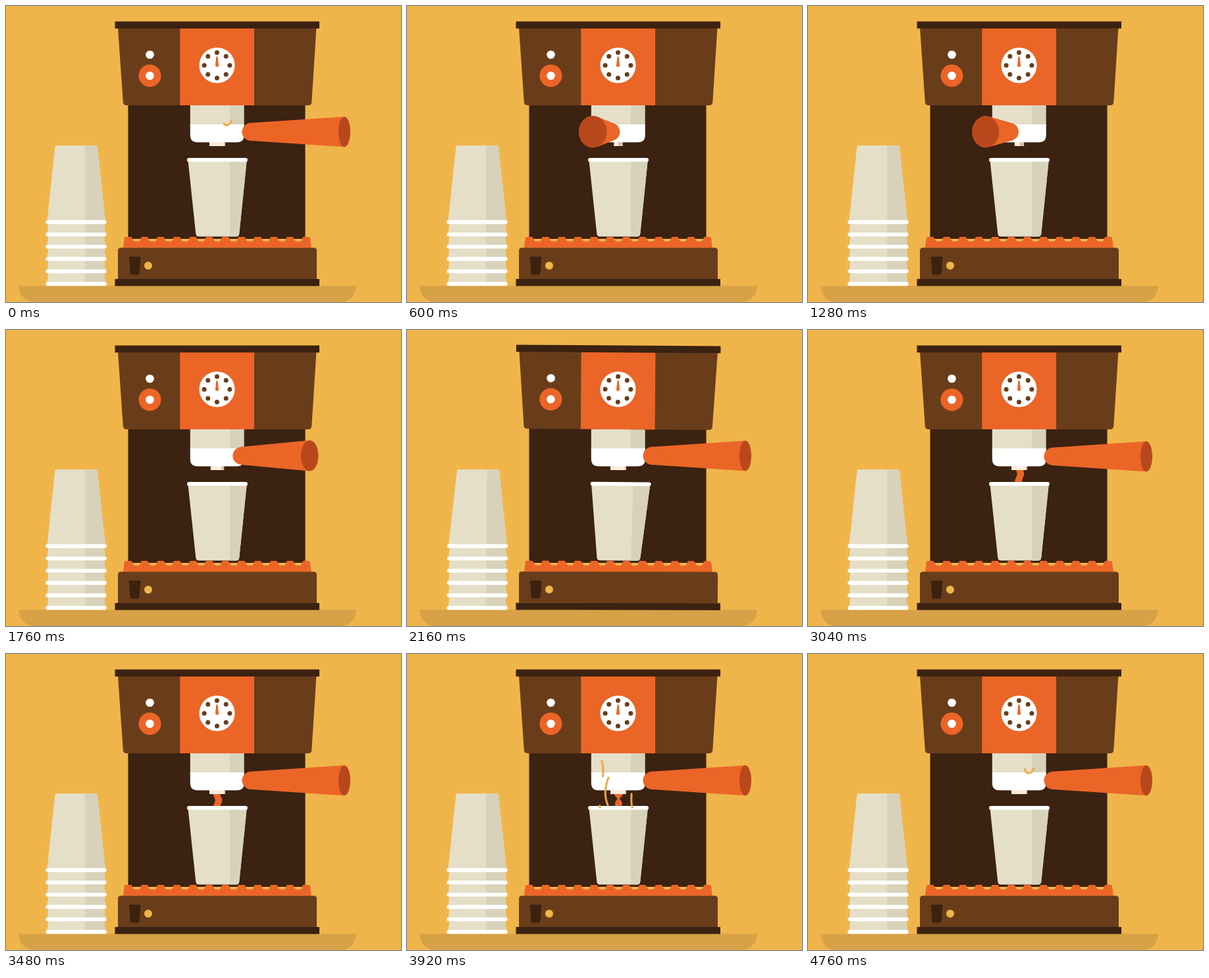
An HTML page that plays this animation: 600 by 450 pixels, repeating every 4800 ms.

```html
<!DOCTYPE html>
<html lang="en">
<head>
<meta charset="utf-8">
<title>Coffee machine</title>
<style>
  html, body { margin: 0; width: 100%; height: 100%; overflow: hidden; background: #f0b54a; }
  svg { display: block; width: 100%; height: 100%; }
  .brown { fill: #6a3d1a; }
  .dark { fill: #3b2211; }
  .orange { fill: #eb6527; }
  .rust { fill: #b8481b; }
  .cream { fill: #e5dfc8; }
  .shade { fill: #d8d2ba; }
  .white { fill: #fff; }
  .steam path { fill: none; stroke: #ecaa42; stroke-width: 3; stroke-linecap: round; }
</style>
</head>
<body>
<svg viewBox="0 0 600 450" xmlns="http://www.w3.org/2000/svg">
  <defs>
    <clipPath id="cupDark"><rect x="340" y="230" width="40" height="125"/></clipPath>
    <clipPath id="stackDark"><rect x="120" y="205" width="40" height="225"/></clipPath>
  </defs>
  <rect width="600" height="450" fill="#f0b54a"/>
  <path fill="#d6a147" d="M19 425.5H532Q530 450 503 451H48Q21 450 19 425.5Z"/>

  <g id="stack"></g>

  <rect class="dark" x="185.5" y="148" width="269" height="206"/>

  <g id="base">
    <path id="tray" class="orange"/>
    <path class="brown" d="M170 415V372Q170 367.5 174.5 367.5H467.500Q472 367.5 472 372V415Z"/>
    <rect class="dark" x="165.5" y="415" width="310.500" height="10.700"/>
    <path class="dark" d="M188 381H203.500Q204.700 381 204.600 382L202.500 406.500Q202.300 408.500 200.500 408.500H191Q189 408.500 188.800 406.500L186.800 382Q186.800 381 188 381Z"/>
    <circle cx="216" cy="394.800" r="6" fill="#f0b54a"/>
  </g>

  <g>
    <rect class="cream" x="279.800" y="148" width="60.200" height="34"/>
    <rect class="shade" x="340" y="148" width="21.700" height="34"/>
    <path class="white" d="M279.800 180H361.700V196Q361.700 207.300 350.500 207.300H291Q279.800 207.300 279.800 196Z"/>
    <rect id="spoutLight" y="207" height="6" fill="#f9ecda"/>
    <rect id="spoutDark" y="207" height="6" fill="#d3c7b0"/>
  </g>

  <g id="head">
    <path class="brown" d="M170 33H471.500L464.300 146Q464 151 459 151H183Q178.200 151 177.800 146Z"/>
    <rect class="orange" x="264.300" y="33" width="112.700" height="118"/>
    <rect class="dark" x="165.500" y="23.500" width="310.500" height="10.700"/>
    <circle class="white" cx="218.500" cy="74" r="6.300"/>
    <circle class="orange" cx="218.500" cy="106" r="17"/>
    <circle class="white" cx="218.500" cy="106" r="6.300"/>
    <circle class="white" cx="320.500" cy="90.200" r="27"/>
    <g id="dots"></g>
    <path class="orange" d="M320.500 76.500Q321.500 76.500 321.700 78L323 90Q323 92.700 320.500 92.700T318 90L319.300 78Q319.500 76.500 320.500 76.500Z"/>
  </g>

  <path id="pour" class="orange"/>

  <g id="cup">
    <path id="cupBody" class="cream" d="M276.500 235H365.700L354.300 346Q353.800 350.500 349.500 350.500H293Q288.800 350.500 288.300 346Z"/>
    <use href="#cupBody" style="display:none"/>
    <path class="shade" clip-path="url(#cupDark)" d="M276.500 235H365.700L354.300 346Q353.800 350.500 349.500 350.500H293Q288.800 350.500 288.300 346Z"/>
    <rect class="white" x="275" y="231" width="92" height="5.800" rx="2.900"/>
  </g>

  <g id="handle">
    <path id="grip" class="orange"/>
    <circle id="hub" class="orange" cy="191.200" r="13.500"/>
    <ellipse id="cap" class="rust" cy="191.200"/>
  </g>

  <g id="steam" class="steam"></g>
</svg>
<script>
const LOOP = 4800;
const $ = id => document.getElementById(id);
const set = (el, attrs) => { for (const k in attrs) el.setAttribute(k, attrs[k]); return el; };
const add = (parent, tag, attrs) =>
  parent.appendChild(set(document.createElementNS('http://www.w3.org/2000/svg', tag), attrs));

function buildStack() {
  const g = $('stack');
  const rims = [328.5, 347.3, 365.9, 384.5, 403.3, 422.5];
  let d = 'M78 212H135.500Q138.600 212 139 215L151 327H62.500L74.300 215Q74.700 212 78 212Z';
  for (let i = 1; i < rims.length; i++)
    d += `M64.500 ${rims[i - 1]}H149L151 ${rims[i]}H62.500Z`;
  add(g, 'path', { d, class: 'cream' });
  add(g, 'path', { d, class: 'shade', 'clip-path': 'url(#stackDark)' });
  for (const y of rims)
    add(g, 'rect', { x: 60.3, y: y - 2.9, width: 92.4, height: 5.8, rx: 2.9, class: 'white' });
}

function buildTray() {
  let d = 'M178 367.600L179.800 353Q180 351 182 351';
  for (let i = 0; i < 11; i++) {
    const x = 198.2 + i * 24.55;
    d += `H${x - 8.5}Q${x - 6.8} 351 ${x - 6} 354T${x - 2.8} 358H${x + 2.8}Q${x + 5.2} 358 ${x + 6} 354.500T${x + 8.5} 351`;
  }
  set($('tray'), { d: d + 'H460Q461.800 351 462 353L463.800 367.600Z' });
}

function buildDots() {
  for (let i = 0; i < 8; i++) {
    const a = i * Math.PI / 4;
    add($('dots'), 'circle', {
      cx: 320.5 + 19.4 * Math.cos(a), cy: 90.2 + 19.4 * Math.sin(a), r: 3.5, class: 'brown'
    });
  }
}

// Lengths are in percent of each path.
const LEFT = 'M293 233C290 218 297 205 297.500 185C299 176 298 170 296 163C294 157 295 152 298 149';
const puffs = [
  { d: LEFT, start: 3595, dur: 500, len: 27 },
  { d: LEFT, start: 3908, dur: 600, len: 27 },
  { d: 'M306 232C299 217 300 203 306 188C310 176 316 170 312 162C309 156 302 158 304 164', start: 3675, dur: 700, len: 50 },
  { d: 'M342 233C340 225 341 220 341 213C341 198 348 188 347 174C346 164 330 163 329.500 174C330 182 338 185 343 174', start: 3730, dur: 1220, len: 22 }
];

// The handle bounces off its stop: slow at the far end, fast at the impact.
const SWING = 113;
function swingAngle(t) {
  const bounce = (from, top, to) => {
    const u = (t - top) / (t < top ? top - from : to - top);
    return SWING * (1 - u * u);
  };
  if (t < 894) return bounce(0, 460, 894);
  if (t < 1853) return bounce(894, 1419, 1853);
  return 0;
}

function drawHandle(t) {
  const c = Math.cos(swingAngle(t) * Math.PI / 180), a = Math.abs(c);
  const y = 191.2, r = 13.5;
  const hx = 320 + 52 * c, cx = 320 + 194 * c;
  const rx = 9 + 15.5 * (1 - a), ry = 23 + 1.5 * (1 - a);

  // Common tangent of the hub circle and the cap ellipse.
  let n = 0, s = 1, h = ry;
  for (let i = 0; i < 12; i++) {
    n = Math.max(-1, Math.min(1, (h - r) / (hx - cx || 1e-6)));
    s = Math.sqrt(1 - n * n);
    h = Math.hypot(rx * n, ry * s);
  }
  const x1 = hx + r * n, y1 = r * s;
  const x2 = cx + rx * rx * n / h, y2 = ry * ry * s / h;
  set($('grip'), { d: `M${x1} ${y - y1}L${x2} ${y - y2}V${y + y2}L${x1} ${y + y1}Z` });
  set($('hub'), { cx: hx });
  set($('cap'), { cx, rx, ry });
  set($('handle'), { transform: `translate(0 ${t > 2860 ? 1 : 0})` });

  const w = 11 + 13 * a, dark = 2 + 5 * (1 - a), left = 321 - w / 2;
  set($('spoutLight'), { x: left, width: w - dark });
  set($('spoutDark'), { x: left + w - dark, width: dark });
}

function drawShake(t) {
  const k = t > 1853 && t < 2860 ? Math.cos((t - 2160) * 2 * Math.PI / 160) : 0;
  const lean = (el, y, deg) =>
    set(el, { transform: `translate(0 ${y}) skewX(${-deg * k}) translate(0 ${-y})` });
  set($('head'), { transform: `rotate(${0.4 * k} 320.500 90)` });
  set($('base'), { transform: `rotate(${0.12 * k} 320.500 395)` });
  lean($('cup'), 350, 1.3);
  set($('cup'), { transform: `${$('cup').getAttribute('transform')} rotate(${0.5 * k} 321 350)` });
  lean($('stack'), 425, 0.4);
}

function drawPour(t) {
  const start = 2890, end = 4060;
  if (t < start || t > end) return set($('pour'), { d: '' });
  const top = 213 + 20 * Math.max(0, (t - end + 90) / 90);
  const bottom = Math.min(233, 213 + (t - start) / 5);
  const thin = Math.max(0, Math.min(1, (t - 3800) / 120));
  const left = [], right = [];
  for (let y = top; y <= bottom; y++) {
    const ph = (y - 213) / 18;
    const mid = 321.3 + 1.7 * (1 - thin) * Math.sin(ph * Math.PI * 1.6 - (t - 3040) / 60);
    const half = 5.3 + thin * (1.2 - 4 * Math.exp(-(((y - 220) / 3.5) ** 2)) - ph * 1.5);
    left.push(`${mid - half} ${y}`);
    right.unshift(`${mid + half} ${y}`);
  }
  set($('pour'), { d: left.length ? 'M' + left.concat(right).join('L') + 'Z' : '' });
}

function drawSteam(t) {
  for (const p of puffs) {
    const u = ((t - p.start + LOOP) % LOOP) / p.dur;
    const on = u > 0 && u < 1;
    set(p.el, {
      visibility: on ? 'visible' : 'hidden',
      'stroke-dashoffset': p.len - (100 + p.len) * Math.min(u, 1)
    });
  }
}

function draw(t) {
  drawHandle(t);
  drawShake(t);
  drawPour(t);
  drawSteam(t);
}

buildStack();
buildTray();
buildDots();
for (const p of puffs)
  p.el = add($('steam'), 'path', { d: p.d, pathLength: 100, 'stroke-dasharray': `${p.len} 400` });

let began = null;
function tick(now) {
  if (began === null) began = now;
  draw((now - began) % LOOP);
  requestAnimationFrame(tick);
}
draw(0);
requestAnimationFrame(tick);
</script>
</body>
</html>
```
